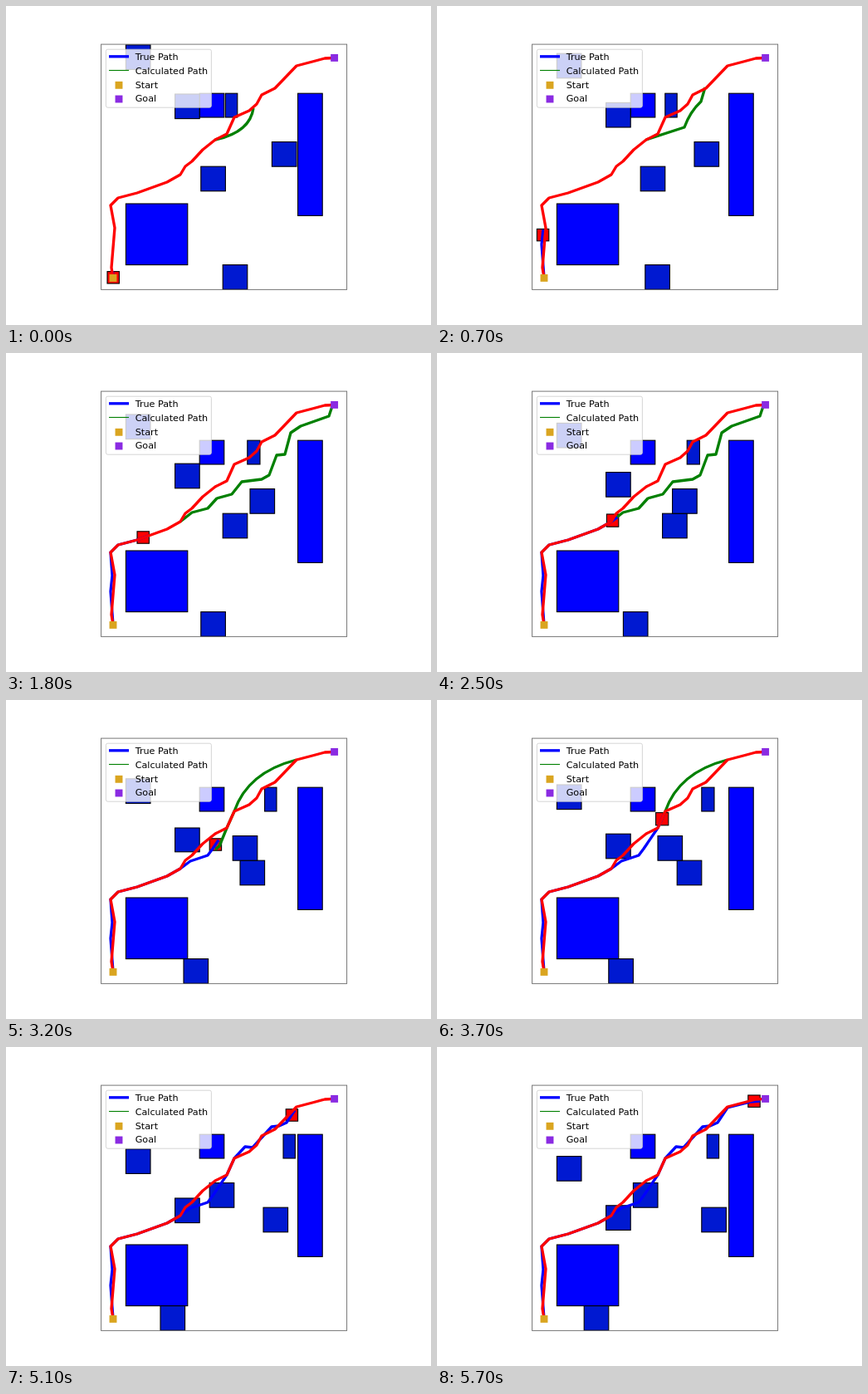
An HTML page that plays this animation: 512x384 px, repeating every 5.8 s.

```html
<!DOCTYPE html>
<html lang="en">
<head>
<meta charset="utf-8">
<title>Path planning</title>
<style>
html, body { margin: 0; width: 100%; height: 100%; overflow: hidden; background: #fff; }
svg { display: block; width: 512px; height: 384px; }
text { font: 11.2px "DejaVu Sans", sans-serif; }
.box { stroke: #000; stroke-width: 1.11; }
.path { fill: none; stroke-width: 3.33; stroke-linejoin: round; }
</style>
</head>
<body>
<svg viewBox="0 0 512 384">
  <clipPath id="ahead"><rect id="front" width="512" height="384"/></clipPath>
  <g id="boxes"></g>
  <rect x="114.6" y="46.1" width="296" height="295.3" fill="none" stroke="#707070" stroke-width=".95"/>
  <g id="robot"></g>
  <path id="plan" class="path" stroke="#008000" clip-path="url(#ahead)"/>
  <path id="trail" class="path" stroke="#00f"/>
  <path id="route" class="path" stroke="#f00"/>
  <g id="ends"></g>
  <rect x="120.4" y="52.2" width="127" height="70" rx="2.2" fill="#fff" fill-opacity=".8" stroke="#ccc" stroke-opacity=".8"/>
  <path d="M124 60.8h24" stroke="#00f" stroke-width="3.33"/>
  <path d="M124 77.5h24" stroke="#008000" stroke-width="1.11"/>
  <g id="labels"></g>
</svg>
<script>
const $ = id => document.getElementById(id);
const PIXEL = 0.8, UNIT = 14.784, LEFT = 114.56, TOP = 46.08;
const STEP = 100, STEPS = 58;

function add(parent, tag, attrs, text = "") {
  const el = document.createElementNS("http://www.w3.org/2000/svg", tag);
  for (const key in attrs) el.setAttribute(key, attrs[key]);
  el.textContent = text;
  $(parent).append(el);
  return el;
}

// Box edges sit on the pixel grid of a larger plot scaled by PIXEL
const snap = (v, shift) => (Math.round(v / PIXEL) + shift) * PIXEL;
function place(el, x, y, w, h) {
  const x0 = snap(x, .5), y0 = snap(y, -.5);
  el.setAttribute("x", x0);
  el.setAttribute("y", y0);
  el.setAttribute("width", snap(x + w * UNIT, .5) - x0);
  el.setAttribute("height", snap(y + h * UNIT, -.5) - y0);
}

const marker = (parent, cx, cy, fill) =>
  add(parent, "rect", { x: cx - 4.45, y: cy - 4.45, width: 8.9, height: 8.9, fill });

marker("ends", 129, 327.4, "#daa520");
marker("ends", 395.6, 62.4, "#8a2be2");
marker("labels", 136, 95.3, "#daa520");
marker("labels", 136, 112, "#8a2be2");
["True Path", "Calculated Path", "Start", "Goal"].forEach((label, i) =>
  add("labels", "text", { x: 155.7, y: 64.9 + 16.8 * i }, label));

// Grid units; dx, dy give the direction of travel
const boxes = [
  { x: 2, y: 13, w: 5, h: 5 },
  { x: 16, y: 4, h: 10 },
  { x: 8, y: 4 },
  { x: 2, y: 0, dy: 1 },
  { x: 6, y: 4, dy: 1 },
  { x: 8, y: 10, dx: 1 },
  { x: 14, y: 8, dx: -1 },
  { x: 10, y: 18, dx: -1 },
  { x: 10, y: 4, w: 1, dx: 1, range: 5 },
].map(({ x, y, w = 2, h = 2, dx = 0, dy = 0, range = 20 }) => {
  const el = add("boxes", "rect", { class: "box", fill: dx || dy ? "#0019d1" : "#00f" });
  return { el, x, y, w, h, dx, dy, range };
});
const robot = add("robot", "rect", { class: "box", fill: "#f00" });

// The driven trail leaves the planned route only around obstacles
const bend = "L126 240 135 231 158 225 194 212 210 203 ";
const gap = "266 154 275 134 ";
$("route").setAttribute("d", "M129 327 127 315 131 267" + bend +
  "216 193 224 187 237 173 252 161 " + gap + "293 126 302 118 308 107 324 99 350 72 371 66.500 384 63 395 62.500");
$("trail").setAttribute("d", "M129 327 126 287 128 268" + bend +
  "222 194 243 187 249 179 " + gap + "288 120 297 121 320 96 329 95 338 91 350 73 378 66 389 65");
const speed = $("trail").getTotalLength() / STEPS;

// Replanned detours, each valid from a given step
const plans = [
  { from: 0, d: "M252 161Q294 152 298 123" },
  { from: 4, d: "M252 161L298 146Q305 127 318 115L323 98" },
  { from: 16, d: "M210 203L224 192 243 187 254 175 272 170 284 155 308 152 317 147 326 123 336 122 343 96 355 88 389 76 393 64" },
  { from: 29, d: "M243 187L257 176 " + gap + "Q291 87 350 72" },
  { from: 40, d: "M288 120H298Q314 95 330 95" },
];

function draw(n) {
  const moved = (n + 1) / 10;
  for (const { el, x, y, w, h, dx, dy, range } of boxes) {
    const d = range - Math.abs(range - moved);
    place(el, LEFT + UNIT * (x + dx * d), TOP + UNIT * (y + dy * d), w, h);
  }

  const pos = $("trail").getPointAtLength(n * speed);
  place(robot, pos.x - UNIT / 2, pos.y - UNIT / 2, 1, 1);
  $("trail").setAttribute("stroke-dasharray", `${(n + 1) * speed} 999`);
  $("front").setAttribute("x", pos.x);
  $("plan").setAttribute("d", plans.findLast(p => p.from <= n).d);
}

const start = performance.now();
function tick() {
  draw(Math.floor((performance.now() - start) / STEP) % STEPS);
  requestAnimationFrame(tick);
}
tick();
</script>
</body>
</html>
```
